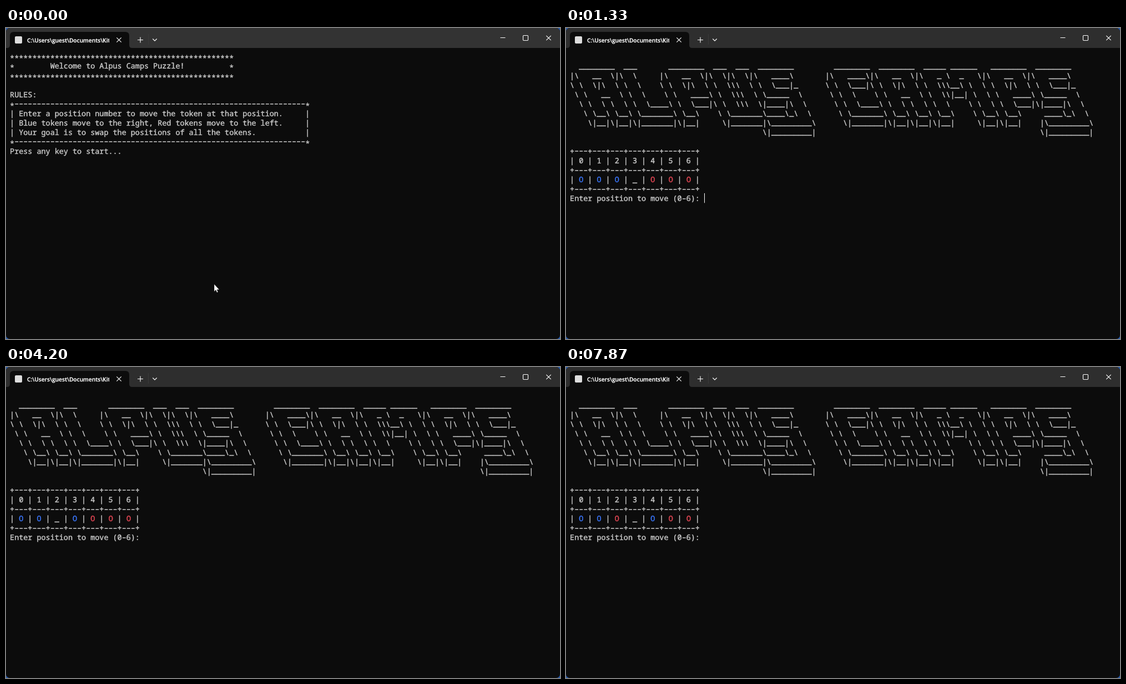
These frames come from a looping animation (998x561 px, 8 s). An HTML page:

```html
<!DOCTYPE html>
<html lang="en">
<head>
<meta charset="utf-8">
<title>Terminal puzzle</title>
<style>
  html, body { margin: 0; height: 100%; overflow: hidden; background: #2a5caa; }
  svg { display: block; width: 100vw; height: 100vh; }
  text { text-rendering: geometricPrecision; font-variant-ligatures: none; }
  .mono {
    font: 500 13.45px "Noto Sans Mono", "DejaVu Sans Mono", monospace;
    fill: #ccc; stroke: #ccc; stroke-width: .42;
  }
  .title {
    font: 600 10.2px "Open Sans", "Noto Sans", sans-serif;
    fill: #fff; stroke: #fff; stroke-width: .25;
  }
  .blue { fill: #3b78ff; stroke: #3b78ff; }
  .red { fill: #e74856; stroke: #e74856; }
  .icon { fill: none; stroke: #fff; stroke-width: 1.1; }

  .anim { animation: 8s step-end infinite; }
  #bar { animation-name: bar; }
  #intro { animation-name: intro; }
  #game { animation-name: game; }
  #board0 { animation-name: board0; }
  #board1 { animation-name: board1; }
  #board2 { animation-name: board2; }
  #board3 { animation-name: board3; }
  #wait { animation-name: wait; }
  #caret { animation-name: caret; }
  .typed { animation-name: typed; }
  #mouse { animation-name: move; }
  #arrow { animation-name: blink; }

  @keyframes bar { 0% { fill: #333; } 1.625% { fill: #2e2e2e; } }
  @keyframes intro { 0% { opacity: 1; } 16.625% { opacity: 0; } }
  @keyframes game { 0% { opacity: 0; } 16.625% { opacity: 1; } }
  @keyframes board0 { 0% { opacity: 1; } 45% { opacity: 0; } }
  @keyframes board1 { 0%, 70% { opacity: 0; } 45% { opacity: 1; } }
  @keyframes board2 { 0%, 90.875% { opacity: 0; } 70% { opacity: 1; } }
  @keyframes board3 { 0% { opacity: 0; } 90.875% { opacity: 1; } }
  @keyframes wait {
    0%, 4.125% { opacity: 0; }
    1.625%, 10.875% { opacity: 1; }
  }
  @keyframes caret {
    0%, 23.375%, 37.5%, 52.5%, 63.375%, 77.5%, 98.375% { opacity: 0; }
    16.625%, 30.875%, 45%, 59.125%, 70%, 90.875% { opacity: 1; }
  }
  @keyframes typed {
    0%, 45%, 70%, 90.875% { opacity: 0; }
    37.5%, 63.375%, 84.125% { opacity: 1; }
  }
  @keyframes move {
    0% { transform: translate(375px, 462px); }
    0.875% { transform: translate(398px, 468px); }
    1.625% { transform: translate(421px, 474px); }
    3.375% { transform: translate(434px, 478px); }
    4.125% { transform: translate(438px, 479px); }
    5.875% { transform: translate(439px, 479px); }
    23.375% { transform: translate(475px, 485px); }
    24.125% { transform: translate(552px, 496px); }
    25% { transform: translate(625px, 504px); }
    25.875% { transform: translate(663px, 506px); }
    26.625% { transform: translate(671px, 505px); }
  }
  @keyframes blink {
    0%, 20.875%, 40.875% { opacity: 1; }
    15.875%, 37.5%, 45% { opacity: 0; }
  }
</style>
</head>
<body>
<svg viewBox="0 0 998 561">
  <defs>
    <clipPath id="win"><rect width="998" height="561" rx="7"/></clipPath>
    <clipPath id="label"><rect x="36" y="10" width="150" height="24"/></clipPath>
  </defs>
  <g clip-path="url(#win)">
    <rect width="998" height="561" fill="#0c0c0c"/>
    <rect id="bar" class="anim" width="998" height="36" fill="#2e2e2e"/>
    <path d="M2 36Q7 36 7 31V14Q7 7 14 7H215Q222 7 222 14V31Q222 36 227 36Z" fill="#0c0c0c"/>
    <rect x="16" y="15" width="13" height="13" rx="2" fill="#ddd"/>
    <g clip-path="url(#label)"><text class="title" x="38" y="25.8">C:\Users\guest\Documents\Kitbox</text></g>
    <path d="M256.5 11V30" stroke="#3a3a3a"/>
    <g class="icon">
      <path d="M199.3 17.3L207.7 25.7M207.7 17.3L199.3 25.7"/>
      <path d="M237 21.5H247M242 16.5V26.5"/>
      <path d="M264.3 19.5L268 23.2L271.7 19.5"/>
      <path d="M890.5 17.5H899.5"/>
      <rect x="931.5" y="13.5" width="9" height="9" rx="1.2"/>
      <path d="M973.3 13.8L981.7 22.2M981.7 13.8L973.3 22.2"/>
    </g>
    <g id="intro" class="anim">
      <rect id="wait" class="anim" x="7" y="230" width="1" height="17" fill="#fff"/>
    </g>
    <g id="game" class="anim">
      <rect id="caret" class="anim" x="249" y="298" width="1" height="17.5" fill="#fff"/>
      <rect class="anim typed" x="257" y="298" width="1" height="17.5" fill="#fff"/>
    </g>
    <g id="mouse" class="anim">
      <path id="arrow" class="anim" d="M0 0V13.4L3 10.6L5 15.2L7 14.3L5.1 9.9H9.2Z" fill="#fff" stroke="#000" stroke-width=".4"/>
    </g>
  </g>
</svg>
<script>
const LEFT = 7.1, CELL = 8.07, BASE = 56.4, PITCH = 17.07;
const SHIFT = { '*': 3, '-': -0.7, '_': -0.8 };
const NS = 'http://www.w3.org/2000/svg';
const $ = id => document.getElementById(id);

function add(parent, tag, attrs, text = '') {
  const el = document.createElementNS(NS, tag);
  for (const key in attrs) el.setAttribute(key, attrs[key]);
  el.textContent = text;
  return parent.appendChild(el);
}

// Characters that sit higher or lower than the font has them get their own layer.
function put(parent, row, col, str, cls = '') {
  const layer = (keep, dy) => {
    const s = [...str].map(ch => keep(ch) ? ch : ' ').join('').trimEnd();
    if (s) add(parent, 'text', {
      class: 'mono ' + cls, x: LEFT + col * CELL, y: BASE + row * PITCH + dy
    }, s.replace(/ /g, '\u00a0').replace(/-/g, '\u2013'));
  };
  layer(ch => !(ch in SHIFT), 0);
  for (const mark in SHIFT) layer(ch => ch === mark, SHIFT[mark]);
}

const stars = '*'.repeat(50);
const edge = '*' + '-'.repeat(65) + '*';
const boxed = s => ('| ' + s).padEnd(66) + '|';
[
  stars,
  '*        Welcome to Alpus Camps Puzzle!'.padEnd(49) + '*',
  stars,
  '',
  'RULES:',
  edge,
  boxed('Enter a position number to move the token at that position.'),
  boxed('Blue tokens move to the right, Red tokens move to the left.'),
  boxed('Your goal is to swap the positions of all the tokens.'),
  edge,
  'Press any key to start...'
].forEach((line, row) => put($('intro'), row, 0, line));

const glyphs = {
  A: String.raw`
  ________
|\   __  \
\ \  \|\  \
 \ \   __  \
  \ \  \ \  \
   \ \__\ \__\
    \|__|\|__|`,
  C: String.raw`
  ________
|\   ____\
\ \  \___|
 \ \  \
  \ \  \____
   \ \_______\
    \|_______|`,
  L: String.raw`
  ___
|\  \
\ \  \
 \ \  \
  \ \  \____
   \ \_______\
    \|_______|`,
  M: String.raw`
  _____ ______
|\   _ \  _   \
\ \  \\\__\ \  \
 \ \  \\|__| \  \
  \ \  \    \ \  \
   \ \__\    \ \__\
    \|__|     \|__|`,
  P: String.raw`
  ________
|\   __  \
\ \  \|\  \
 \ \   ____\
  \ \  \___|
   \ \__\
    \|__|`,
  S: String.raw`
  ________
|\   ____\
\ \  \___|_
 \ \_____  \
  \|____|\  \
    ____\_\  \
   |\_________\
   \|_________|`,
  U: String.raw`
  ___  ___
|\  \|\  \
\ \  \\\  \
 \ \  \\\  \
  \ \  \\\  \
   \ \_______\
    \|_______|`
};

// Neighbouring letters share their slanted edges.
const art = Array.from({ length: 8 }, () => Array(118).fill(' '));
function banner(word, col) {
  for (const letter of word) {
    glyphs[letter].split('\n').slice(1).forEach((line, r) => {
      [...line].forEach((ch, c) => { if (ch !== ' ') art[r][col + c] = ch; });
    });
    col += letter === 'M' ? 15 : 10;
  }
}
banner('ALPUS', 0);
banner('CAMPS', 57);

const game = $('game');
art.forEach((line, r) => put(game, r + 1, 0, line.join('')));
const rule = '+' + '---+'.repeat(7);
for (const row of [10, 12, 14]) put(game, row, 0, rule);
put(game, 11, 0, '| 0 | 1 | 2 | 3 | 4 | 5 | 6 |');
put(game, 13, 0, '|   '.repeat(7) + '|');
put(game, 15, 0, 'Enter position to move (0-6):');

// Each board lists its tokens and the digit typed while it shows.
[['BBB_RRR', '2'], ['BB_BRRR', '4'], ['BBRB_RR', '3'], ['BBR_BRR', '']].forEach(([tokens, digit], i) => {
  const board = add(game, 'g', { id: 'board' + i, class: 'anim' });
  [...tokens].forEach((t, n) => put(board, 13, 2 + 4 * n, t === '_' ? '_' : 'O', { B: 'blue', R: 'red' }[t]));
  put(board, 15, 30, digit, 'anim typed');
});
</script>
</body>
</html>
```
